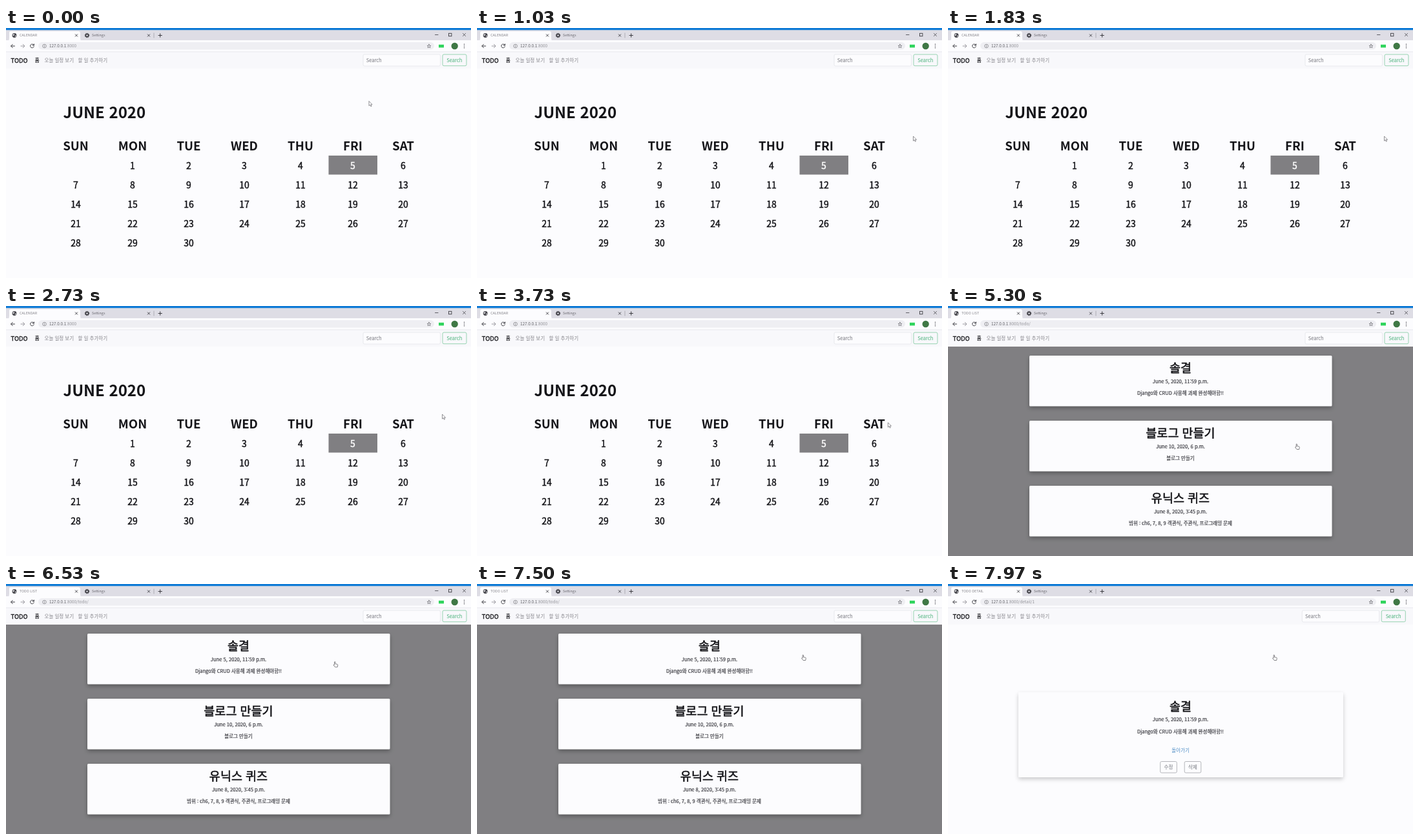
An HTML page that plays this animation: 720 by 388 pixels, repeating every 8000 ms.

```html
<!DOCTYPE html>
<html lang="ko">
<head>
<meta charset="utf-8">
<style>
html, body { margin: 0; width: 100%; height: 100%; overflow: hidden; background: #fcfcfe; }
svg { display: block; width: 100vw; height: 100vh; }
text {
  font-family: "Noto Sans CJK KR", "Noto Sans CJK", "Noto Sans", sans-serif;
  font-variant-ligatures: no-contextual;
  white-space: pre;
}
.line { fill: none; stroke-linecap: round; stroke-linejoin: round; }
</style>
</head>
<body>
<svg id="stage" viewBox="0 0 720 388" preserveAspectRatio="none">
  <defs>
    <filter id="shadow" x="-10%" y="-20%" width="120%" height="150%">
      <feDropShadow dx="0" dy="3" stdDeviation="3" flood-color="#000" flood-opacity=".3"/>
    </filter>
    <filter id="softShadow" x="-10%" y="-20%" width="120%" height="150%">
      <feDropShadow dx="0" dy="3" stdDeviation="3" flood-color="#000" flood-opacity=".2"/>
    </filter>
  </defs>
  <g id="calendar"></g>
  <g id="list"></g>
  <g id="detail"></g>
  <g id="chrome"></g>
  <g id="nav"></g>
  <path id="arrow" d="M0 0V7.2L1.7 5.7L2.9 8.3L4 7.8L2.9 5.3H5.1Z" fill="#fff" stroke="#66656a" stroke-width=".7"/>
  <path id="hand" d="M1.6 5.4V1Q2.3 0 3 1V4L5.6 4.5Q7 4.7 6.8 6L6.2 9H2.6L.2 6Q0 4.8 1.6 5.4Z"
        fill="#fff" stroke="#66656a" stroke-width=".8"/>
</svg>
<script>
const LOOP = 8000;
const INK = '#141418', DARK = '#3c3c42', MUTED = '#85848a', GRAY = '#807f82', PAPER = '#fcfcfe';
const $ = id => document.getElementById(id);

function add(parent, tag, attrs, content) {
  const el = document.createElementNS('http://www.w3.org/2000/svg', tag);
  for (const key in attrs) el.setAttribute(key, attrs[key]);
  if (content) el.textContent = content;
  parent.append(el);
  return el;
}
const rect = (p, x, y, width, height, fill, more) =>
  add(p, 'rect', { x, y, width, height, fill, ...more });
const circle = (p, cx, cy, r, fill, more) =>
  add(p, 'circle', { cx, cy, r, fill, ...more });
const line = (p, d, stroke, width = 1) =>
  add(p, 'path', { d, stroke, 'stroke-width': width, class: 'line' });

// Medium weight is a regular face with a fine outline.
function label(p, x, y, size, content, fill = INK, weight = 400) {
  const outline = weight === 500 ? { stroke: fill, 'stroke-width': size * .03 } : {};
  return add(p, 'text', {
    x, y, fill, 'font-size': size, 'font-weight': weight === 700 ? 700 : 400, ...outline
  }, content);
}
function centered(p, ...args) {
  label(p, ...args).setAttribute('text-anchor', 'middle');
}
const cross = (p, x, y, r, color, width) =>
  line(p, `M${x - r} ${y - r}l${2 * r} ${2 * r}m0 ${-2 * r}l${-2 * r} ${2 * r}`, color, width);

function drawCalendar(p) {
  const columns = [108, 196, 283, 369, 456, 537, 615];
  rect(p, 0, 0, 720, 388, PAPER);
  label(p, 88.5, 139.5, 24, 'JUNE 2020', INK, 700);
  'SUN MON TUE WED THU FRI SAT'.split(' ').forEach((day, i) =>
    centered(p, columns[i], 189.5, 18.7, day, INK, 700));
  rect(p, 499.5, 198, 75.5, 29.5, GRAY);
  for (let day = 1; day <= 30; day++) {
    const row = Math.floor(day / 7);
    centered(p, columns[day % 7], 218.5 + row * 30, 14, day, day === 5 ? '#fff' : INK, 500);
  }
}

function drawTodo(p, y, title, date, note) {
  centered(p, 360, y, 18.5, title, INK, 500);
  centered(p, 360, y + 16.5, 7.6, date, DARK, 500);
  centered(p, 360, y + 35, 7.5, note, DARK, 500);
}

function drawList(p) {
  rect(p, 0, 0, 720, 388, GRAY);
  todos.forEach((todo, i) => {
    rect(p, 126, 77 + i * 101, 468.5, 78.5, PAPER, { rx: 1.5, filter: 'url(#shadow)' });
    drawTodo(p, 103 + i * 101, ...todo);
  });
}

function drawDetail(p) {
  rect(p, 0, 0, 720, 388, PAPER);
  rect(p, 109, 168, 503, 132, PAPER, { rx: 2, filter: 'url(#softShadow)' });
  drawTodo(p, 196.5, ...todos[0]);
  centered(p, 360, 261.3, 7.5, '돌아가기', '#4a8ac4');
  [[341.5, '수정'], [379, '삭제']].forEach(([x, name]) => {
    rect(p, x - 12.8, 275.5, 25.6, 17.5, 'none', { rx: 2, stroke: '#b4b5ba', 'stroke-width': 1 });
    centered(p, x, 287, 7.5, name, '#74777e');
  });
}

function drawChrome(p) {
  rect(p, 0, 0, 720, 20, '#dedde5');
  rect(p, 0, 0, 720, 3.2, '#117cd6');
  rect(p, 0, 19, 720, 19, PAPER);
  add(p, 'path', { d: 'M3 20Q5 19 5 16V7Q5 5 8 5H112Q115 5 115 8V16Q115 19 117 20Z', fill: PAPER });
  rect(p, 50, 22, 613, 11.5, '#efeff3', { rx: 5.7 });
  line(p, 'M0 37H720', '#dcdce1', .7);

  ui.globe = add(p, 'g', {});
  circle(ui.globe, 13, 11.5, 3.4, '#48484e');
  add(ui.globe, 'path', { d: 'M10.5 10L13 9L12.5 11.5L11 12.5ZM14 11.5L16 12L14.5 14Z', fill: '#e6e6ea' });
  ui.spinner = add(p, 'path', { d: 'M13 8.2A3.3 3.3 0 0 1 16.3 11.5', stroke: '#b4b5ba', class: 'line' });
  ui.tab = label(p, 21, 13.4, 5.4, '', MUTED);
  cross(p, 109, 11.5, 1.7, DARK, .9);

  circle(p, 125.5, 11.5, 2.2, 'none', { stroke: DARK, 'stroke-width': 1.7 });
  circle(p, 125.5, 11.5, 3.3, 'none', { stroke: DARK, 'stroke-width': 1, 'stroke-dasharray': '1.3 1.3' });
  label(p, 133, 13.4, 5.4, 'Settings', '#68676e');
  cross(p, 221, 11.5, 1.7, DARK, .9);
  line(p, 'M229 8V15', '#98979e', .7);
  line(p, 'M236 11.5H241.4M238.7 8.8V14.2', DARK, 1);

  line(p, 'M664.5 10.5H669', DARK, .8);
  rect(p, 685.5, 8.3, 4.4, 4.4, 'none', { stroke: DARK, 'stroke-width': .9 });
  cross(p, 709.5, 10.5, 2, DARK, .8);

  line(p, 'M13.5 28H7.8M10.3 25.3L7.6 28L10.3 30.7', DARK, 1);
  line(p, 'M23 28H28.7M26.2 25.3L28.9 28L26.2 30.7', '#98979e', 1);
  ui.reload = line(p, 'M42.9 26.2A2.9 2.9 0 1 0 43.3 28.8M43.4 24.9V27H41.2', DARK, 1);
  ui.stop = cross(p, 40.5, 28, 2.2, DARK, 1);
  circle(p, 59.5, 28, 2.8, 'none', { stroke: MUTED, 'stroke-width': .8 });
  line(p, 'M59.5 27.8V29.4M59.5 26.5V26.6', MUTED, .8);
  const address = label(p, 67, 30.3, 6.3, '', '#5c5c62');
  add(address, 'tspan', {}, '127.0.0.1');
  ui.path = add(address, 'tspan', { fill: '#929298' });

  line(p, 'M655 25.2L655.8 27.2L658 27.3L656.3 28.7L656.9 30.8L655 29.6L653.1 30.8L653.7 28.7L652 27.3L654.2 27.2Z', '#68676e', .7);
  rect(p, 670, 25.8, 8, 4.6, '#2fd45c');
  circle(p, 694.7, 28, 5.2, '#3f7845');
  [25.2, 28, 30.8].forEach(y => circle(p, 709.5, y, .7, DARK));
}

function drawNav(p) {
  rect(p, 0, 38, 720, 25, '#f8f8fb');
  label(p, 7.6, 53.6, 9.5, 'TODO', INK, 500);
  label(p, 44.8, 52.8, 7.5, '홈', INK, 500);
  label(p, 59.5, 52.8, 7.5, '오늘 일정 보기', MUTED);
  label(p, 111.5, 52.8, 7.5, '할 일 추가하기', MUTED);
  ui.search = add(p, 'g', {});
  rect(ui.search, 553, 41, 119.5, 18, PAPER, { rx: 2, stroke: '#e4e5ea', 'stroke-width': .8 });
  label(ui.search, 557.7, 52.8, 7.5, 'Search', '#75757c');
  rect(ui.search, 676, 41, 37, 17.7, 'none', { rx: 2, stroke: '#97d2b2', 'stroke-width': 1 });
  centered(ui.search, 694.3, 52.8, 7.5, 'Search', '#46b078');
}

const ui = {};
const todos = [
  ['솔결', 'June 5, 2020, 11:59 p.m.', 'Django와 CRUD 사용해 과제 완성해야함!!'],
  ['블로그 만들기', 'June 10, 2020, 6 p.m.', '블로그 만들기'],
  ['유닉스 퀴즈', 'June 8, 2020, 3:45 p.m.', '범위 : ch6, 7, 8, 9 객관식, 주관식, 프로그래밍 문제']
];
// start time, page, tab title, address path, loading
const states = [
  [0, 'calendar', 'CALENDAR', ':8000', false],
  [4600, 'calendar', '127.0.0.1:8000/todo/', ':8000/todo/', true],
  [4830, 'list', 'TODO LIST', ':8000/todo/', false],
  [7530, 'list', '127.0.0.1:8000/detail', ':8000/detail/1', true],
  [7750, 'detail', 'TODO DETAIL', ':8000/detail/1', false]
];
// time, x, y of the pointer tip
const pointerPath = [
  [0, 562, 113.5], [900, 675.5, 168], [3450, 675.5, 168], [4250, 537.5, 213.5],
  [5850, 537.5, 213.5], [6650, 505, 114], [7000, 502.5, 109.5], [LOOP, 502.5, 109.5]
];

function pointerAt(t) {
  const i = pointerPath.findIndex(step => step[0] > t);
  const [t0, x0, y0] = pointerPath[i - 1], [t1, x1, y1] = pointerPath[i];
  const k = (t - t0) / (t1 - t0), ease = k * k * (3 - 2 * k);
  return [x0 + (x1 - x0) * ease, y0 + (y1 - y0) * ease];
}

const show = (el, on) => { el.style.display = on ? '' : 'none'; };

function render(t) {
  const [, page, title, path, loading] = states.findLast(state => state[0] <= t);
  for (const id of ['calendar', 'list', 'detail']) show($(id), id === page);
  ui.tab.textContent = title;
  ui.path.textContent = path;
  show(ui.globe, !loading);
  show(ui.reload, !loading);
  show(ui.spinner, loading);
  show(ui.stop, loading);
  ui.spinner.setAttribute('transform', `rotate(${-t * .36} 13 11.5)`);
  ui.search.setAttribute('transform', `translate(${page === 'detail' ? -4.7 : 0} 0)`);

  const [x, y] = pointerAt(t);
  const overDay = x < 575 && y > 198;
  const overCard = y < 155.5 || y > 178;
  const clickable = page === 'calendar' ? overDay : overCard;
  show($('hand'), clickable);
  show($('arrow'), !clickable);
  for (const id of ['hand', 'arrow']) $(id).setAttribute('transform', `translate(${x} ${y})`);
}

drawCalendar($('calendar'));
drawList($('list'));
drawDetail($('detail'));
drawChrome($('chrome'));
drawNav($('nav'));

const start = performance.now();
function tick() {
  render((performance.now() - start) % LOOP);
  requestAnimationFrame(tick);
}
tick();
</script>
</body>
</html>
```
